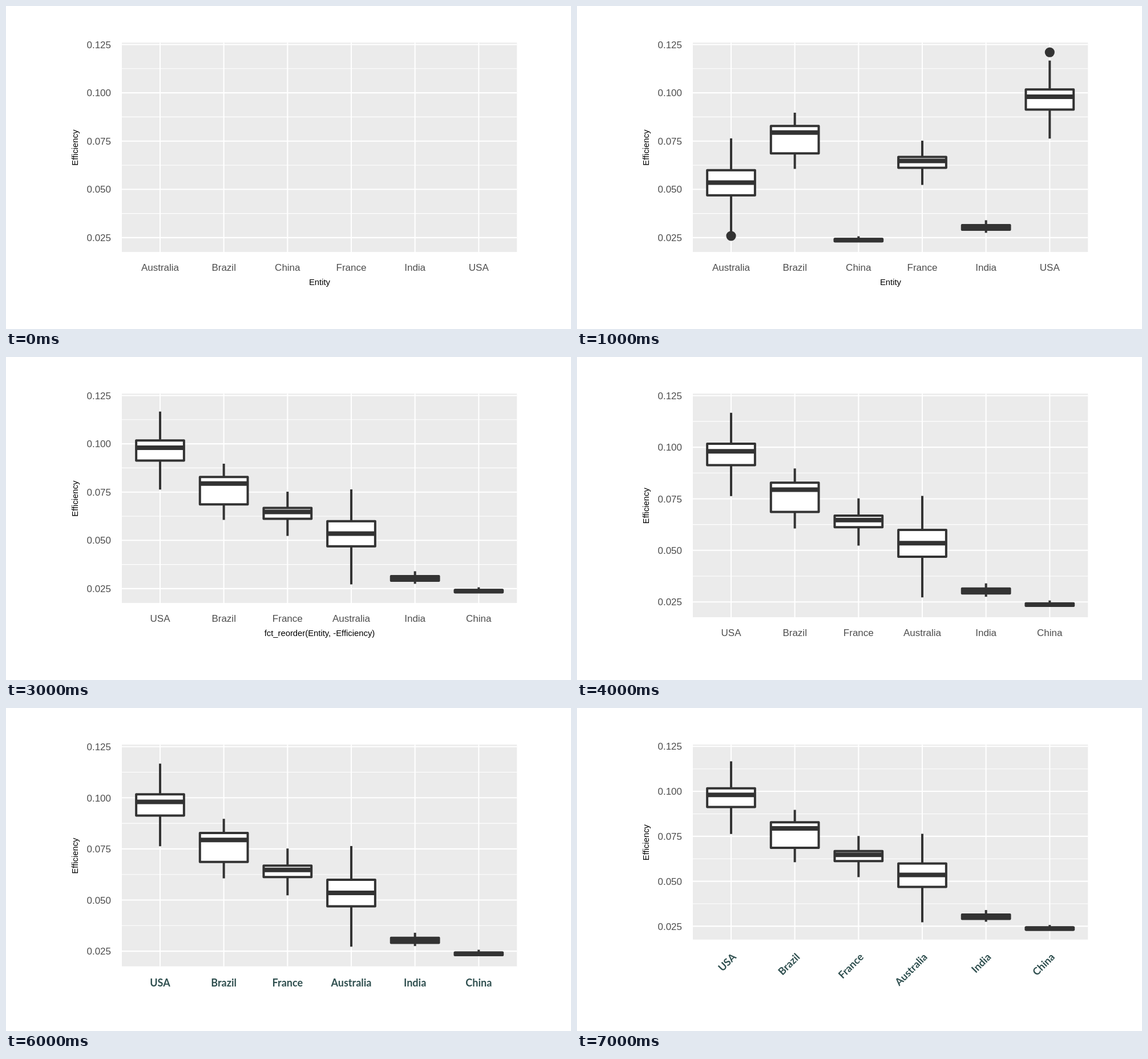
Animation of 990 by 566 pixels, one loop 8000 ms. Source, as an HTML page with a canvas:

```html
<!DOCTYPE html>
<html lang="en">
<head>
<meta charset="utf-8">
<title>Efficiency boxplots</title>
<style>
  html, body { margin: 0; width: 100%; height: 100%; overflow: hidden; background: #fff; }
  canvas { display: block; }
</style>
</head>
<body>
<canvas id="stage" width="990" height="566"></canvas>
<script>
const ctx = document.getElementById('stage').getContext('2d');
const SANS = '"Liberation Sans", Arial, sans-serif';
const PANEL = { left: 203, right: 895.3, top: 64.2 };
const Y_MAX = 0.12598, Y_RANGE = 0.1084;
const STEP_MS = 1000;

// Lower whisker, first quartile, median, third quartile, upper whisker
const stats = {
  Australia: [0.0272, 0.0469, 0.0535, 0.0599, 0.0764],
  Brazil: [0.0606, 0.0686, 0.0794, 0.0828, 0.0897],
  China: [0.0229, 0.0231, 0.0237, 0.0243, 0.0257],
  France: [0.0523, 0.0612, 0.0647, 0.0668, 0.0752],
  India: [0.0275, 0.0291, 0.0303, 0.0315, 0.0340],
  USA: [0.0763, 0.0913, 0.0980, 0.1017, 0.1167]
};
const outliers = { Australia: 0.0259, USA: 0.1210 };

const byName = Object.keys(stats);
const byValue = [...byName].sort((a, b) => stats[b][2] - stats[a][2]);

const plain = { font: `17px ${SANS}`, color: '#4d4d4d' };
const bold = { font: `bold 17px ${SANS}`, color: '#2f4f4f' };
const humanist = { font: 'bold 18px Lato, sans-serif', color: '#2f4f4f' };

const initial = { order: byName, bottom: 431, title: 'Entity', label: plain, baseline: 464, boxes: true };
const sorted = { ...initial, order: byValue, title: 'fct_reorder(Entity, -Efficiency)' };
const untitled = { ...sorted, title: '', bottom: 456, baseline: 489 };
const states = [
  { ...initial, boxes: false },
  { ...initial, outliers: true },
  initial,
  sorted,
  untitled,
  { ...untitled, bottom: 455.3, label: bold },
  { ...untitled, bottom: 452.7, label: humanist, baseline: 488 },
  { ...untitled, bottom: 405.8, label: humanist, baseline: 437.5, tilted: true }
];

const unit = (PANEL.right - PANEL.left) / 6.2;
const xOf = i => PANEL.left + (i + 0.6) * unit;
const yOf = (v, bottom) => PANEL.top + (Y_MAX - v) / Y_RANGE * (bottom - PANEL.top);

function line(x1, y1, x2, y2, width, color) {
  ctx.lineWidth = width;
  ctx.strokeStyle = color;
  ctx.beginPath();
  ctx.moveTo(x1, y1);
  ctx.lineTo(x2, y2);
  ctx.stroke();
}

function text(str, x, y, { font, color }, align = 'center', angle = 0) {
  ctx.save();
  ctx.translate(x, y);
  ctx.rotate(angle);
  ctx.font = font;
  ctx.fillStyle = color;
  ctx.textAlign = align;
  ctx.fillText(str, 0, 0);
  ctx.restore();
}

function drawPanel({ bottom }) {
  const { left, right, top } = PANEL;
  ctx.fillStyle = '#ebebeb';
  ctx.fillRect(left, top, right - left, bottom - top);
  for (let i = 0; i < 4; i++) {
    const y = yOf(0.0375 + i * 0.025, bottom);
    line(left, y, right, y, 1.1, '#fff');
  }
  for (let i = 1; i <= 5; i++) {
    const y = yOf(i * 0.025, bottom);
    line(left, y, right, y, 2.1, '#fff');
    text((i * 0.025).toFixed(3), 184, y + 6.2, plain, 'right');
  }
  for (let i = 0; i < 6; i++) line(xOf(i), top, xOf(i), bottom, 2.1, '#fff');
}

function drawBox(name, x, { bottom, outliers: showOutliers }) {
  const [low, q1, median, q3, high] = stats[name].map(v => yOf(v, bottom));
  const half = unit * 0.375, ink = '#333';
  if (showOutliers && name in outliers) {
    ctx.fillStyle = ink;
    ctx.beginPath();
    ctx.arc(x, yOf(outliers[name], bottom), 8.6, 0, Math.PI * 2);
    ctx.fill();
  }
  line(x, high, x, q3, 4, ink);
  line(x, q1, x, low, 4, ink);
  ctx.fillStyle = '#fff';
  ctx.fillRect(x - half, q3, half * 2, q1 - q3);
  ctx.lineJoin = 'round';
  ctx.strokeRect(x - half, q3, half * 2, q1 - q3);
  line(x - half, median, x + half, median, 8, ink);
}

function draw(state) {
  ctx.fillStyle = '#fff';
  ctx.fillRect(0, 0, 990, 566);
  drawPanel(state);
  state.order.forEach((name, i) => {
    const x = xOf(i);
    if (state.boxes) drawBox(name, x, state);
    if (state.tilted) text(name, x + 10, state.baseline, state.label, 'right', -Math.PI / 4);
    else text(name, x, state.baseline, state.label);
  });
  const titleStyle = { font: `14.8px ${SANS}`, color: '#000' };
  text(state.title, (PANEL.left + PANEL.right) / 2 + 0.3, 489, titleStyle);
  text('Efficiency', 125.6, (PANEL.top + state.bottom) / 2 + 0.6, titleStyle, 'center', -Math.PI / 2);
}

function tick() {
  draw(states[Math.floor(performance.now() / STEP_MS) % states.length]);
  requestAnimationFrame(tick);
}
tick();
</script>
</body>
</html>
```
